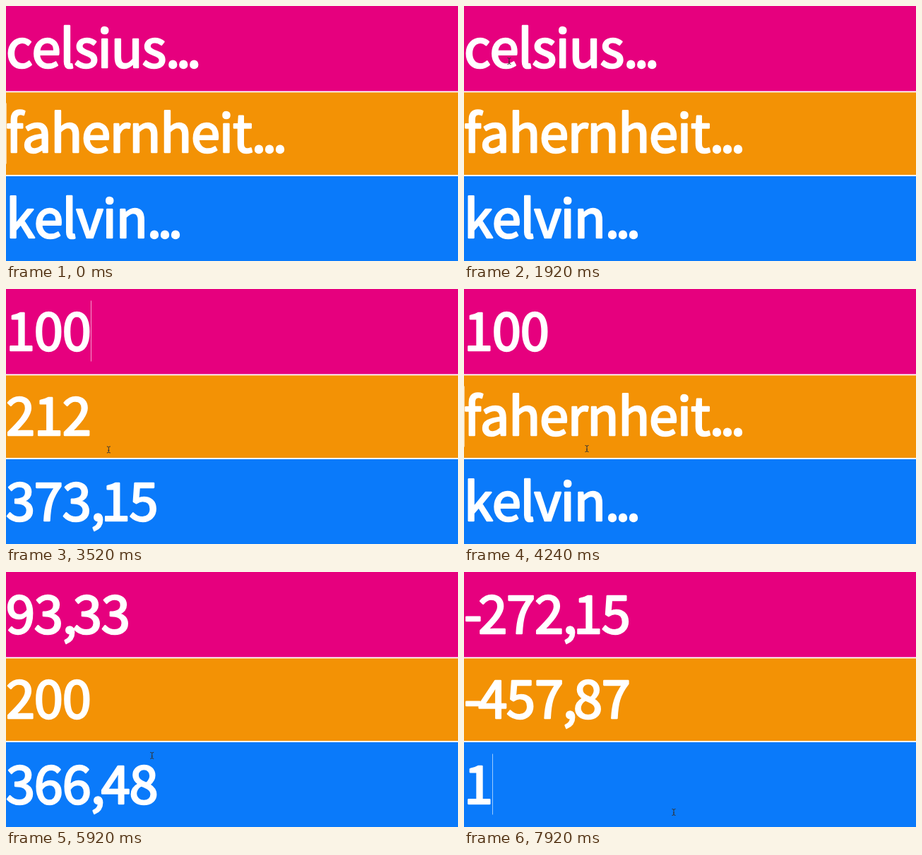
Animation of 640 by 361 pixels, one loop 8000 ms. Source, as an HTML page:

```html
<!DOCTYPE html>
<html lang="en">
<head>
<meta charset="utf-8">
<title>Temperature converter</title>
<style>
html, body { margin: 0; width: 100%; height: 100%; overflow: hidden; background: #fff; }
svg { display: block; }
text {
  font: 500 74px "Noto Sans CJK JP", "Noto Sans CJK SC", "Noto Sans", sans-serif;
  font-kerning: none; letter-spacing: -1.2px;
  fill: #fff; stroke: #fff; stroke-width: 2.6px; stroke-linejoin: round;
}
.tight { letter-spacing: -5.5px; }
</style>
</head>
<body>
<svg width="640" height="361" viewBox="0 0 640 361">
  <rect width="640" height="120.5" fill="#e6007e"/>
  <rect y="122.3" width="640" height="116.7" fill="#f39205"/>
  <rect y="241" width="640" height="120" fill="#0a7afa"/>
  <text x="0" y="87"></text>
  <text x="0" y="207.3"></text>
  <text x="0" y="327.6"></text>
  <rect id="caret" width="1" height="86" fill="#fff" opacity=".6"/>
  <path id="mouse" d="M-2.5-4.5Q0-4.5 0-3Q0-4.5 2.5-4.5M0-3V3M-2.5 4.5Q0 4.5 0 3Q0 4.5 2.5 4.5M-1 1H1" fill="none" stroke="#333" stroke-width="1"/>
</svg>
<script>
const LOOP = 8000;
const hints = ['celsius...', 'fahernheit...', 'kelvin...'];
const toCelsius = [v => v, v => (v - 32) / 1.8, v => v - 273.15];
const fromCelsius = [c => c, c => c * 1.8 + 32, c => c + 273.15];

// [time, focused row, typed value, row that keeps its old value, that value]
const steps = [
  [0, 1, ''], [1200, 0, ''], [2000, 0, '1'], [2160, 0, '10'], [2320, 0, '100'],
  [4240, 1, '', 0, '100'], [5040, 1, '2'], [5280, 1, '20'], [5440, 1, '200'],
  [6800, 2, '', 1, '200'], [7840, 2, '1']
];
const caretOff = [[320, 720], [1680, 2000], [2800, 3200], [3760, 4240], [4720, 5040], [5920, 6400], [7280, 7680]];
const mousePath = [
  [320, -6, 104], [1040, 64, 78], [3040, 64, 78], [3600, 150, 236], [3800, 171, 258],
  [4080, 174, 226], [5760, 174, 226], [6240, 299, 355], [6400, 299, 355], [6640, 297, 340]
];

const rows = [...document.querySelectorAll('text')];
const caret = document.getElementById('caret');
const mouse = document.getElementById('mouse');
const format = v => String(+v.toFixed(2)).replace('.', ',');

function setText(el, s) {
  if (el.dataset.value === s) return;
  el.dataset.value = s;
  el.innerHTML = s.replace(/[-.,]+/g, '<tspan class="tight">$&</tspan>');
}

function mouseAt(t) {
  const i = mousePath.findIndex(p => p[0] > t);
  if (i < 1) return (i ? mousePath.at(-1) : mousePath[0]).slice(1);
  const [a, b] = [mousePath[i - 1], mousePath[i]];
  const u = (t - a[0]) / (b[0] - a[0]), e = u * u * (3 - 2 * u);
  return [1, 2].map(k => a[k] + (b[k] - a[k]) * e);
}

function draw(t) {
  const [, focus, typed, kept, old] = steps.findLast(s => s[0] <= t);
  rows.forEach((el, i) => {
    let s = hints[i];
    if (typed) s = i === focus ? typed : format(fromCelsius[i](toCelsius[focus](+typed)));
    else if (i === kept) s = old;
    setText(el, s);
  });
  caret.setAttribute('x', typed.length * 40);
  caret.setAttribute('y', [16.5, 137.5, 257.5][focus]);
  const hidden = caretOff.some(([a, b]) => t >= a && t < b);
  caret.setAttribute('visibility', hidden ? 'hidden' : 'visible');
  mouse.setAttribute('transform', `translate(${mouseAt(t)})`);
}

const start = performance.now();
function tick() {
  draw((performance.now() - start) % LOOP);
  requestAnimationFrame(tick);
}
tick();
</script>
</body>
</html>
```
